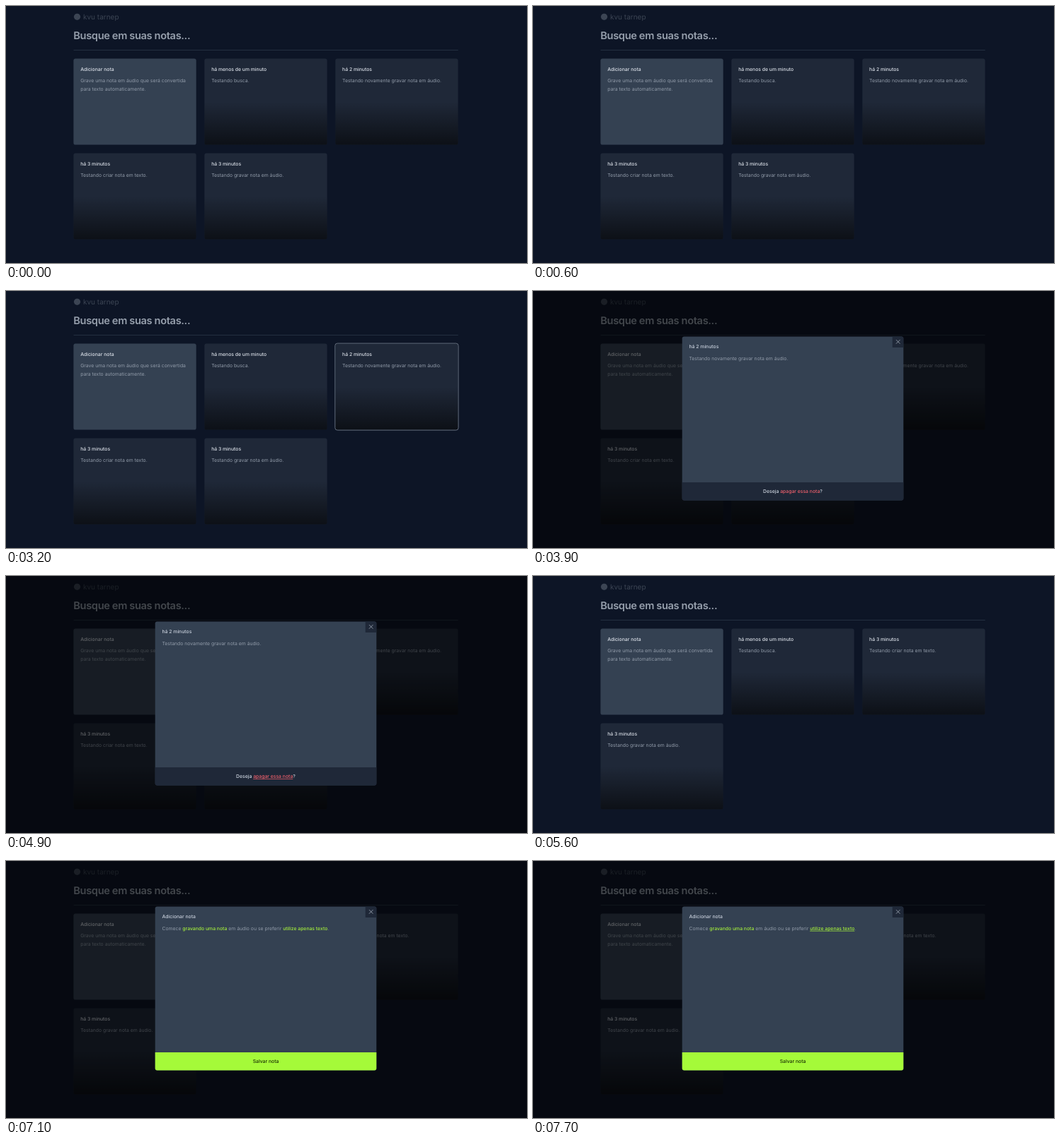
An HTML page that plays this animation: 736x364 px, repeating every 8000 ms.

```html
<!DOCTYPE html>
<html lang="pt-BR">
<head>
<meta charset="utf-8">
<title>Notas</title>
<style>
  html, body { margin: 0; width: 100%; height: 100%; overflow: hidden; background: #0d1526; }
  svg { display: block; width: 736px; height: 364px; }
  text { font: 400 6.83px Inter, sans-serif; fill: #929caa; text-rendering: geometricPrecision; white-space: pre; }
  .search { font-size: 14.65px; font-weight: 600; letter-spacing: -.025em; fill: #969fac; }
  .brand { font-size: 10px; fill: #3c4554; }
  .title { font-weight: 500; fill: #dde2ea; }
  .dialog .title { fill: #c8d0dc; }
  .mid { text-anchor: middle; font-weight: 500; fill: #cbd3de; }
  .save { fill: #1a2e05; }
  .lime { font-weight: 500; fill: #a4ef3c; }
  .red { fill: #f0606c; }
  .line .link { text-decoration: underline; }
  .ring { fill: none; stroke: #626c7b; }
</style>
</head>
<body>
<svg id="stage" viewBox="0 0 736 364">
  <defs>
    <linearGradient id="fade" x1="0" y1="0" x2="0" y2="1">
      <stop offset="0" stop-color="#000" stop-opacity="0"/>
      <stop offset="1" stop-color="#000" stop-opacity=".6"/>
    </linearGradient>
    <clipPath id="round"><rect x="210.7" y="64.4" width="312.6" height="232" rx="2.9"/></clipPath>
  </defs>
  <rect width="736" height="364" fill="#0d1526"/>
  <circle cx="100.5" cy="15.3" r="4.6" fill="#3c4554"/>
  <text class="brand" x="109" y="18.6">kvu tarnep</text>
  <text class="search" x="95.3" y="47.2">Busque em suas notas...</text>
  <rect x="95.5" y="62.2" width="543.2" height=".6" fill="#344152"/>
  <g id="cards"></g>
  <g id="modal"></g>
</svg>
<script>
const LOOP = 8000;
const W = 173.3, H = 122, STEP_X = 184.95, STEP_Y = 133.9;

const addNote = ['Adicionar nota', 'Grave uma nota em áudio que será convertida', 'para texto automaticamente.'];
const recent = ['há menos de um minuto', 'Testando busca.'];
const spoken = ['há 2 minutos', 'Testando novamente gravar nota em áudio.'];
const typed = ['há 3 minutos', 'Testando criar nota em texto.'];
const oldest = ['há 3 minutos', 'Testando gravar nota em áudio.'];
const before = [addNote, recent, spoken, typed, oldest];
const after = [addNote, recent, typed, oldest];

// start time, notes, hovered card, dialog, link underlined
const steps = [
  [0, before],
  [300, before, 0],
  [400, before, 1],
  [500, before, 4],
  [600, before],
  [3000, before, 2],
  [3900, before, -1, 'note'],
  [4900, before, -1, 'note', true],
  [5600, after],
  [6000, after, 0],
  [7100, after, -1, 'add'],
  [7700, after, -1, 'add', true],
];

const label = (x, y, str, cls = '') => `<text class="${cls}" x="${x}" y="${y}">${str}</text>`;
const box = (x, y, w, h, fill, rx = 0) =>
  `<rect x="${x}" y="${y}" width="${w}" height="${h}" rx="${rx}" fill="${fill}"/>`;

function card([title, ...lines], i, hovered) {
  const x = 95.4 + (i % 3) * STEP_X;
  const y = 74.6 + Math.floor(i / 3) * STEP_Y;
  return box(x, y, W, H, i ? '#1f2838' : '#344152', 2.9)
    + (i ? box(x, y + H / 2, W, H / 2, 'url(#fade)', 2.9) : '')
    + label(x + 9.8, y + 17.1, title, 'title')
    + lines.map((s, n) => label(x + 9.8, y + 33.6 + n * 11.7, s)).join('')
    + (hovered ? `<rect class="ring" x="${x - .5}" y="${y - .5}" width="${W + 1}" height="${H + 1}" rx="3.4"/>` : '');
}

function dialog(kind, line) {
  const add = kind === 'add';
  const body = add
    ? 'Comece <tspan class="lime">gravando uma nota</tspan> em áudio ou se preferir <tspan class="lime link">utilize apenas texto</tspan>.'
    : spoken[1];
  const footer = add ? 'Salvar nota' : 'Deseja <tspan class="red link">apagar essa nota</tspan>?';
  return box(0, 0, 736, 364, 'rgba(0,0,0,.56)')
    + `<g class="dialog ${line ? 'line' : ''}"><g clip-path="url(#round)">`
    + box(210, 64, 314, 233, '#344152')
    + box(507.7, 64, 16, 16, '#1f2838')
    + box(210, 271, 314, 26, add ? '#a5fa39' : '#1f2838')
    + '</g><path d="M513.2 69.4l5 5m0-5l-5 5" stroke="#929caa" stroke-width=".9" stroke-linecap="round"/>'
    + label(220.5, 81.4, add ? addNote[0] : spoken[0], 'title')
    + label(220.5, 97.8, body)
    + label(367, 286.2, footer, add ? 'mid save' : 'mid')
    + '</g>';
}

const cards = document.getElementById('cards');
const modal = document.getElementById('modal');
const start = performance.now();
let shown;

function tick() {
  const t = (performance.now() - start) % LOOP;
  const step = steps.findLast(s => s[0] <= t);
  if (step !== shown) {
    shown = step;
    const [, notes, hover = -1, kind, line] = step;
    cards.innerHTML = notes.map((n, i) => card(n, i, i === hover)).join('');
    modal.innerHTML = kind ? dialog(kind, line) : '';
  }
  requestAnimationFrame(tick);
}
tick();
</script>
</body>
</html>
```
